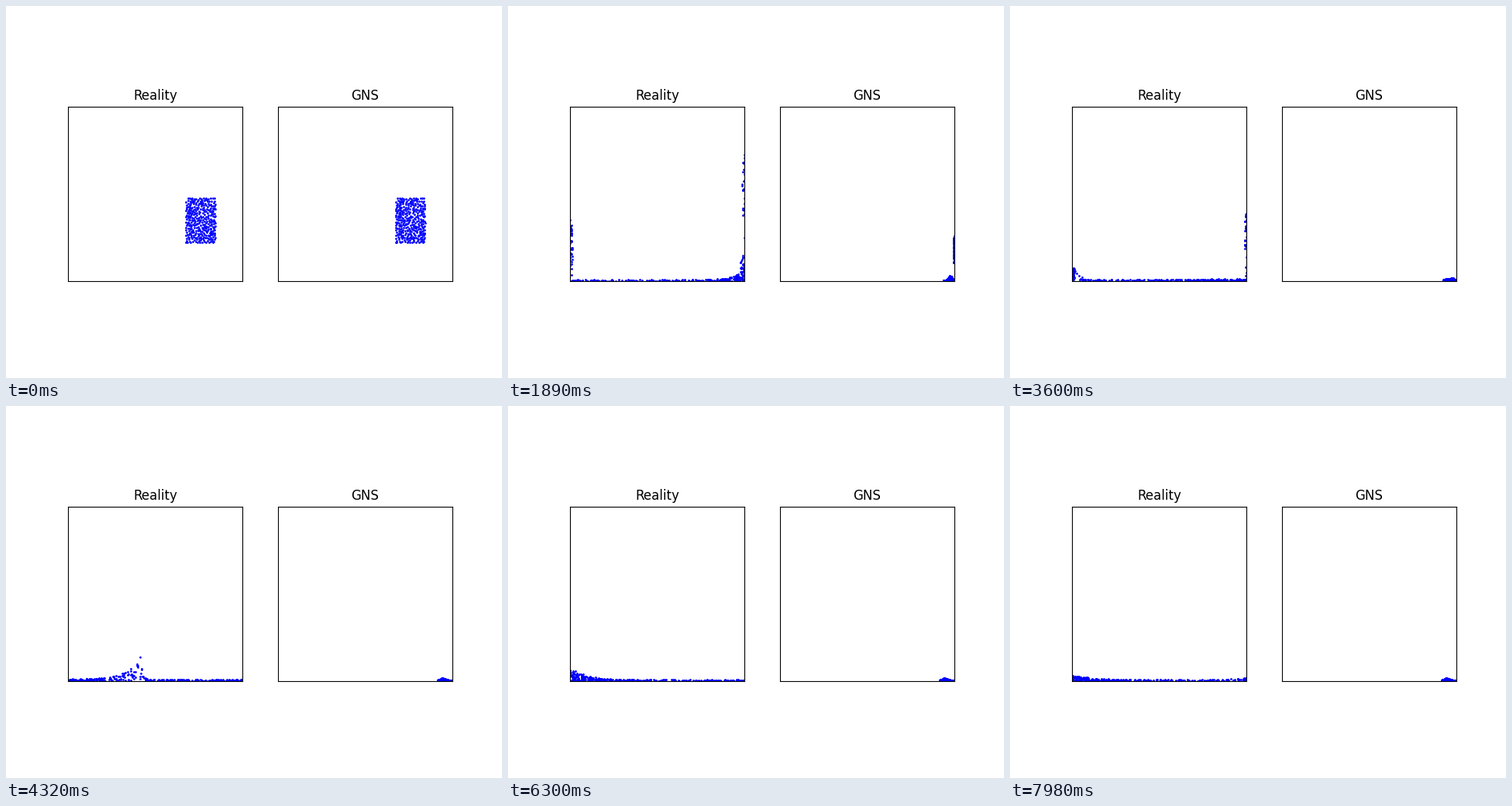
Write a matplotlib script that moves like this. It is 640 by 480 pixels and loops after 8000 ms.

```python
import numpy as np
import matplotlib.pyplot as plt
from matplotlib.animation import FuncAnimation

LOOP, TICK, STEP = 8000, 20, 30   # ms: loop, drawing interval, simulation step
SIDE = 225.45                     # side of the square box in pixels
N = 320                           # particles
LEFT, WIDTH, HEIGHT = 152, 38, 58 # the block of water
LIFT = 49.5                       # its height above the floor at the start
IMPACT, SINK = 740, 410           # ms until it lands, ms it takes to sink
G = 7.4e-5                        # half the gravity, px per ms squared
rng = np.random.default_rng(4)


def scatter_block(n, w, h, tries=7):
    """Evenly spaced random points in a w by h block, sorted by x, in 0..1."""
    pts = rng.random((1, 2)) * (w, h)
    while len(pts) < n:
        cand = rng.random((tries, 2)) * (w, h)
        gap = np.hypot(*(cand[:, None] - pts[None]).transpose(2, 0, 1)).min(axis=1)
        pts = np.vstack([pts, cand[gap.argmax()]])
    return pts[pts[:, 0].argsort()].T / [[w], [h]]


def ease(t, start, end):
    s = np.clip((t - start) / (end - start), 0, 1)
    return s * s * (3 - 2 * s)


def drop(t):
    return max(0, LIFT * (1 - (t / IMPACT) ** 2))


def arc(t, peak, top):
    """Height of water thrown up a wall."""
    return max(0, top - G * (t - peak) ** 2)


def grip(height):
    """How firmly a wall holds the climbing water."""
    return min(1, height / 25)


def near(distance):
    return np.clip(1 - distance / 20, 0, 1)


def crest(x, t, x0, t0, speed, height):
    """A passing wave, with a steep face when it travels right."""
    d = x - x0 - speed * (t - t0)
    width = np.where((d > 0) & (speed > 0), 3, 18)
    return height * np.exp(-np.abs(d) / width - ((t - t0) / 400) ** 2)


u, v = scatter_block(N, WIDTH, HEIGHT)
start_x = LEFT + WIDTH * u
margin = 2.5 * rng.random(N) ** 2
throw = rng.random(N) ** 0.7
phase = 2 * np.pi * rng.random(N)
mixed = 1 - np.abs(1 - np.abs(u + rng.normal(0, 0.015, N)))

# Waves in the real water: place, time, speed, height.
CRESTS = [(0, 2900, 0, 12), (93, 4320, .12, 30), (0, 6200, 0, 9), (SIDE, 7500, 0, 12)]
JET_L, JET_R = 0.12, 0.07         # shares of the water that climb each wall


def reality(t):
    since = t - IMPACT
    left, right = arc(t, 2490, 110), arc(t, 2430, 195)
    mix = ease(t, 880, 1280)
    rank = u + mix * (mixed - u)

    # Pool: an even layer pushed right, then sloshing back to the left.
    a, b = JET_L * grip(left), 1 - JET_R * grip(right)
    s = np.clip((rank - a) / (b - a), 0, 1)
    slosh = 0.27 - 0.47 * ease(t, 1900, 5900)
    pool = SIDE * (s + slosh * np.sin(np.pi * s)) + 3 * mix * np.sin(t / 600 + phase)
    density = 1 / (1 + np.pi * slosh * np.cos(np.pi * s))

    # Each particle runs along the floor once its layer has landed.
    run = np.maximum(0, since - SINK * v)
    reach = 0.26 * np.abs(2 * u - 1) * run + 1e-4 * run ** 2
    x = start_x + np.clip(pool - start_x, -reach, reach)
    x = np.clip(x, margin, SIDE - margin)

    depth = 1.5 + 0.8 * density ** 2 + sum(crest(x, t, *c) for c in CRESTS)
    y = np.maximum(HEIGHT * (v - max(0, since) / SINK), v * depth)
    jet = np.where(mixed < JET_L, left * near(x), 0)
    jet = np.where(mixed > 1 - JET_R, right * near(SIDE - x), jet)
    return x, np.maximum(y, throw * jet) + drop(t)


def gns(t):
    since = max(0, t - IMPACT)
    up = arc(t, 1890, 58)
    spread = ease(t, 2900, 4200)

    # The block leans, slides to the right wall and ends as a small mound.
    edge = 211 - 5 * spread
    s = np.clip(u / (1 - 0.5 * grip(up)), 0, 1)
    shift = 2 * min(1, t / IMPACT) + 0.056 * since * (1 - v)
    shift = shift + 3e-4 * max(0, since - 160) ** 2
    x = np.minimum(start_x - 2 * max(0, 1 - t / IMPACT) * 0 + shift,
                   edge + (SIDE - edge) * s)
    x = np.minimum(x, SIDE - margin / 2)

    depth = 1.5 + 2.5 * spread * np.exp(-((x - 213) / 4) ** 2)
    depth = depth + 6 * (1 - spread) * np.exp(-((x - 220) / 3) ** 2)
    y = v * np.maximum(HEIGHT * (1 - since / SINK), depth)
    jet = np.where(u > 0.5, up * near(SIDE - x), 0)
    return x, np.maximum(y, (1 - 0.57 * v ** 2) * jet) + drop(t)


fig, axes = plt.subplots(1, 2, figsize=(6.4, 4.8), dpi=100)
dots = []
for ax, title in zip(axes, ("Reality", "GNS")):
    ax.set(xlim=(0, SIDE), ylim=(0, SIDE), xticks=[], yticks=[], aspect="equal")
    ax.set_title(title)
    dots += ax.plot([], [], ".", ms=2, color="blue")


def draw(i):
    t = i * TICK // STEP * STEP
    for dot, model in zip(dots, (reality, gns)):
        dot.set_data(*model(t))
    return dots


anim = FuncAnimation(fig, draw, frames=LOOP // TICK, interval=TICK,
                     repeat=True, repeat_delay=0)
plt.show()
```
